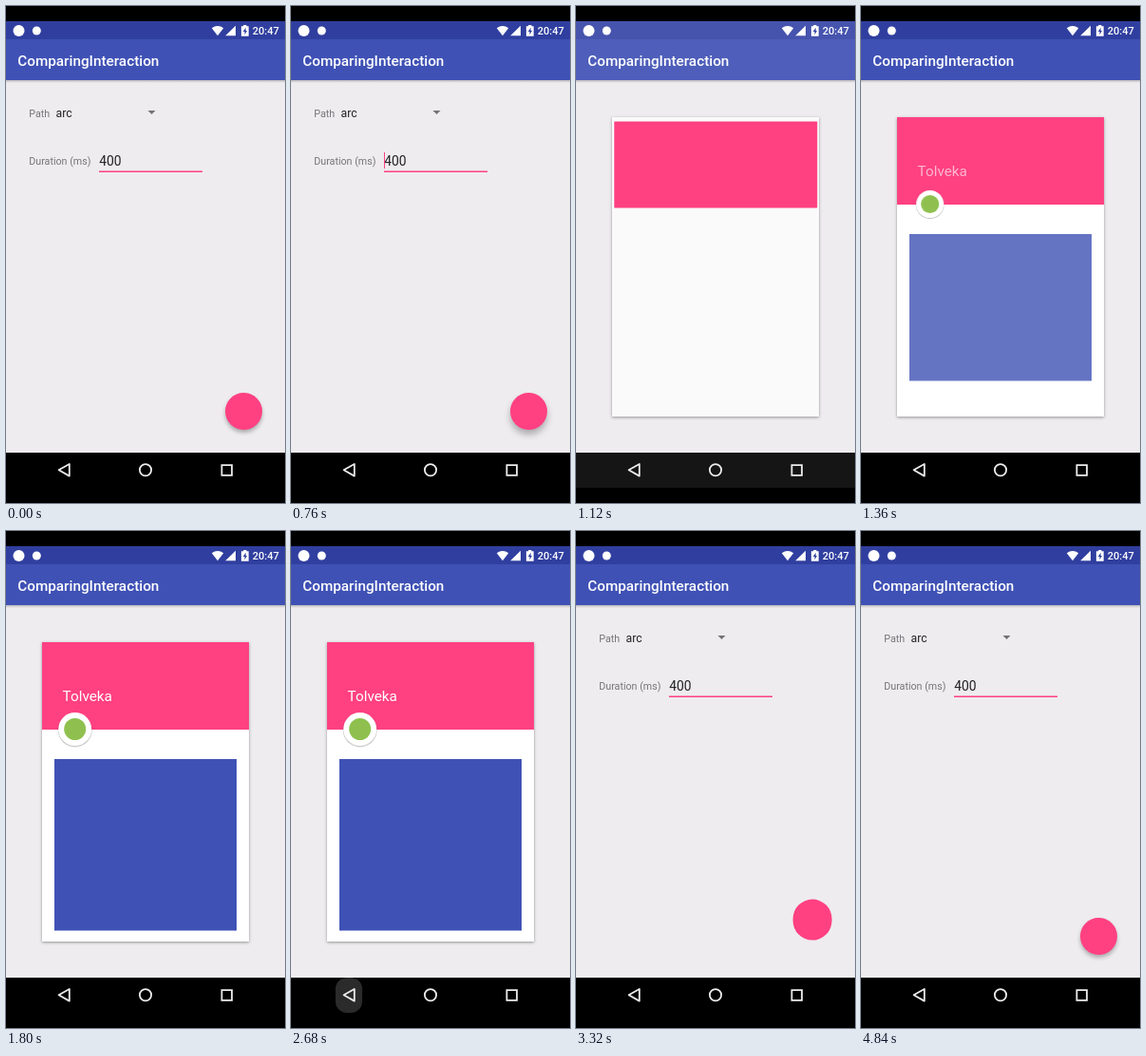
Animation, 294 px wide and 523 px high, one loop 5 s. Source, as an HTML page:

```html
<!DOCTYPE html>
<html lang="en">
<head>
<meta charset="utf-8">
<title>Shared element arc</title>
<style>
  :root { --pink: #ff4081; --indigo: #3f51b5; --page: #eeecef; }
  html, body { margin: 0; width: 100%; height: 100%; overflow: hidden; background: #000; }
  body { position: relative; font-family: Roboto, "Noto Sans", sans-serif; }
  svg, div { position: absolute; left: 0; top: 0; }
  svg { width: 294px; height: 523px; }

  /* Every part shares one 5 s clock: 1% = 50 ms */
  .form, .cursor, .card, .morph, .content, .name, .avatar, .panel, .status, .veil, .ripple {
    animation: 5s linear infinite;
  }

  .form { animation-name: form; }
  @keyframes form {
    0%, 15.6% { opacity: 1; }
    18.4% { opacity: .45; }
    22%, 58.6% { opacity: 0; }
    60% { opacity: .22; }
    65.6%, 100% { opacity: 1; }
  }

  .cursor { animation-name: cursor; animation-timing-function: step-end; }
  @keyframes cursor {
    0% { opacity: 0; }
    6% { opacity: 1; }
    22% { opacity: 0; }
    67.2% { opacity: 1; }
    75.2% { opacity: 0; }
    85.6% { opacity: 1; }
    96.8%, 100% { opacity: 0; }
  }

  .card {
    left: 38px; top: 117px; width: 218px; height: 315px; z-index: 1;
    box-shadow: 0 1px 3px rgba(0, 0, 0, .38);
    animation-name: card;
  }
  @keyframes card {
    0%, 15.7% { opacity: 0; background: var(--page); }
    18.4% { opacity: .82; background: var(--page); }
    20% { opacity: 1; background: #f3f2f4; }
    24%, 57.6% { opacity: 1; background: #fff; }
    60% { opacity: .9; background: #ebebeb; }
    64.2%, 100% { opacity: 0; background: var(--page); }
  }

  /* The button travels up one arc and falls back along the other */
  .morph {
    background: var(--pink);
    offset-path: path("M250.5 426.5 A460 460 0 0 1 147 163 A460 460 0 0 1 250.5 426.5");
    offset-rotate: 0deg;
    animation-name: travel, shape, lift, layer;
  }
  @keyframes travel {
    0%, 15.66% { offset-distance: 0%; animation-timing-function: cubic-bezier(.4, 0, .2, 1); }
    23.66%, 59.36% { offset-distance: 50%; animation-timing-function: cubic-bezier(.4, 0, .2, 1); }
    69.42%, 100% { offset-distance: 100%; }
  }
  @keyframes shape {
    0%, 15.66% {
      width: 39px; height: 39px; border-radius: 19.5px;
      animation-timing-function: cubic-bezier(.5, 0, .9, .6);
    }
    18.4% {
      width: 68px; height: 59px; border-radius: 29px;
      animation-timing-function: cubic-bezier(.2, .4, .3, 1);
    }
    23.66%, 59.36% { width: 218px; height: 92px; border-radius: 0; }
    60% {
      width: 205px; height: 92px; border-radius: 13px;
      animation-timing-function: cubic-bezier(.3, .2, .3, 1);
    }
    66.4% { width: 41px; height: 43px; border-radius: 21px; }
    69.42%, 100% { width: 39px; height: 39px; border-radius: 19.5px; }
  }
  @keyframes lift {
    0%, 10% { box-shadow: 0 3px 4px rgba(0, 0, 0, .28); }
    14%, 15.6% { box-shadow: 0 5px 7px rgba(0, 0, 0, .28); }
    16%, 66.5% { box-shadow: 0 0 0 rgba(0, 0, 0, 0); }
    71%, 100% { box-shadow: 0 3px 4px rgba(0, 0, 0, .28); }
  }
  @keyframes layer {
    0%, 22.5% { z-index: 4; }
    22.6%, 59.2% { z-index: 2; }
    59.3%, 100% { z-index: 4; }
  }

  .content { z-index: 3; animation-name: content; }
  @keyframes content {
    0%, 57.6% { opacity: 1; }
    60% { opacity: .63; }
    63.4%, 100% { opacity: 0; }
  }

  .name { animation-name: name; }
  @keyframes name {
    0%, 23.6% { opacity: 0; }
    27.2% { opacity: .62; }
    31%, 100% { opacity: 1; }
  }

  .avatar, .panel { transform-box: view-box; }
  .avatar { transform-origin: 72.7px 208.5px; animation-name: pop; }
  .panel { transform-origin: 51px 240px; animation-name: unroll; }
  @keyframes pop {
    0%, 22.8% { transform: scale(0); animation-timing-function: cubic-bezier(.2, .6, .6, .9); }
    27.2% { transform: scale(.83); animation-timing-function: ease-out; }
    32.4%, 100% { transform: none; }
  }
  @keyframes unroll {
    0%, 22.8% { transform: scaleY(0); opacity: 0; animation-timing-function: cubic-bezier(.2, .6, .6, .9); }
    27.2% { transform: scaleY(.855); opacity: .8; animation-timing-function: ease-out; }
    32.4%, 100% { transform: scaleY(1); opacity: 1; }
  }

  .chrome { z-index: 5; }
  .status { fill: #303f9f; animation-name: status; }
  @keyframes status {
    0%, 15.6% { fill: #303f9f; }
    18%, 20% { fill: var(--indigo); }
    24%, 57.6% { fill: #303f9f; }
    60%, 62% { fill: var(--indigo); }
    65.6%, 100% { fill: #303f9f; }
  }
  .veil { fill: var(--page); animation-name: veil; }
  @keyframes veil {
    0%, 15.6% { opacity: 0; }
    18.4%, 19.4% { opacity: .26; }
    24%, 57.6% { opacity: 0; }
    60%, 61% { opacity: .35; }
    65.6%, 100% { opacity: 0; }
  }
  .ripple { fill: #fff; animation-name: ripple; }
  @keyframes ripple {
    0%, 53.58% { opacity: 0; x: 47px; width: 28px; rx: 12px; }
    53.6% { opacity: .17; x: 47px; width: 28px; rx: 12px; }
    60% { opacity: .13; x: 20px; width: 82px; rx: 18px; }
    64%, 100% { opacity: 0; x: 16px; width: 90px; rx: 18px; }
  }
</style>
</head>
<body>
  <svg viewBox="0 0 294 523">
    <defs>
      <linearGradient id="edge" x2="0" y2="1">
        <stop stop-color="#000" stop-opacity=".22"/>
        <stop offset="1" stop-color="#000" stop-opacity="0"/>
      </linearGradient>
    </defs>
    <rect y="78" width="294" height="392" fill="#eeecef"/>
    <rect y="78" width="294" height="3" fill="url(#edge)"/>
    <g class="form">
      <g font-size="10.7" fill="#757477">
        <text x="24.3" y="116.5">Path</text>
        <text x="24.3" y="167.3">Duration (ms)</text>
      </g>
      <g fill="#222">
        <text x="52.5" y="116.8" font-size="12.25">arc</text>
        <text x="98.3" y="168.3" font-size="13.8">400</text>
      </g>
      <path d="M149.5 110h8l-4 4z" fill="#737275"/>
      <path d="M98 174.3H207" stroke="#ff4081" stroke-width="1.5"/>
      <path class="cursor" d="M98.5 154V171" stroke="#ff4081"/>
    </g>
  </svg>

  <div class="card"></div>
  <div class="morph"></div>

  <svg class="content" viewBox="0 0 294 523">
    <text class="name" x="59.6" y="179.3" font-size="15.3" fill="#fff">Tolveka</text>
    <g class="avatar">
      <circle cx="72.7" cy="209.4" r="18" fill="#000" opacity=".2"/>
      <circle cx="72.7" cy="208.5" r="17.5" fill="#fff"/>
      <circle cx="72.7" cy="208.5" r="11.5" fill="#8fc04f"/>
    </g>
    <rect class="panel" x="51" y="240" width="192" height="180.5" fill="#3f51b5"/>
  </svg>

  <svg class="chrome" viewBox="0 0 294 523">
    <rect class="status" y="16" width="294" height="19.3"/>
    <rect y="35" width="294" height="43" fill="#3f51b5"/>
    <rect y="470" width="294" height="37"/>
    <path class="veil" d="M0 16H294V78H0zM0 470H294V507H0z"/>
    <rect class="ripple" y="470" height="37"/>

    <g fill="#fff" font-weight="500">
      <circle cx="13.5" cy="26" r="6"/>
      <circle cx="32.3" cy="26" r="4.5"/>
      <path d="M216.8 23.3Q223 18.8 229.2 23.3L223 31.3z"/>
      <path d="M242 20.8V31.3H231.2z"/>
      <path d="M250.2 21.2V20h3.2v1.2h2.3V31.8h-7.8V21.2z"/>
      <path d="M252.6 22.8L249.8 27h1.7v3.2L254 26h-1.4z" fill="#303f9f"/>
      <text x="287.8" y="30.2" font-size="11" text-anchor="end">20:47</text>
      <text x="12.2" y="63.2" font-size="15.3">ComparingInteraction</text>
    </g>

    <g fill="none" stroke="#ececec" stroke-width="1.8" stroke-linejoin="round">
      <path d="M55.6 488.3L66.8 482V494.6z"/>
      <circle cx="147" cy="488.3" r="6.1"/>
      <path d="M227.4 483.2h10.6v10.6h-10.6z" stroke-linejoin="miter"/>
    </g>
  </svg>
</body>
</html>
```
